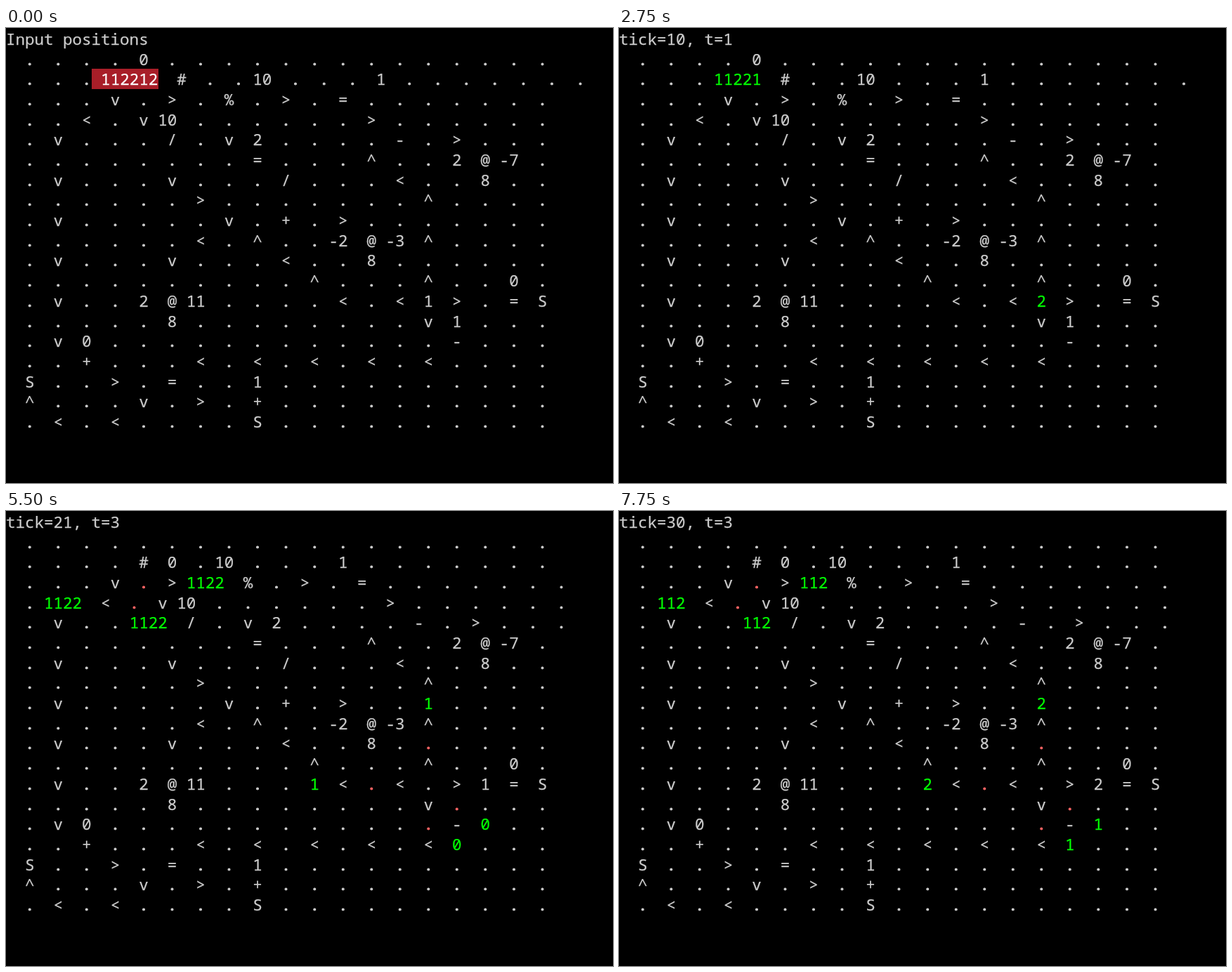
An HTML page with a canvas that plays this animation: 864x648 px, repeating every 8 s.

```html
<!DOCTYPE html>
<html lang="en">
<head>
<meta charset="utf-8">
<title>Grid program run</title>
<style>
  html, body { margin: 0; width: 100%; height: 100%; overflow: hidden; background: #000; }
  canvas { display: block; width: 864px; height: 648px; }
</style>
</head>
<body>
<canvas id="stage"></canvas>
<script>
const W = 864, H = 648, COLS = 19;
const FRAME = 250, LOOP = 8000, LAST_TICK = 30;
const ADV = 13.512, LINE = 28.69, BASE = 23.9;
const GRAY = '#ccc', GREEN = '#00ff00', RED = '#ff6464', MARK = '#a81e28';

// Trailing empty cells are left off; A is the input.
const program = `
. . . . 0
. . . A # . . 10 . . . 1
. . . v . > . % . > . =
. . < . v 10 . . . . . . >
. v . . . / . v 2 . . . . - . >
. . . . . . . . = . . . ^ . . 2 @ -7
. v . . . v . . . / . . . < . . 8
. . . . . . > . . . . . . . ^
. v . . . . . v . + . >
. . . . . . < . ^ . . -2 @ -3 ^
. v . . . v . . . < . . 8
. . . . . . . . . . ^ . . . ^ . . 0
. v . . 2 @ 11 . . . . < . < 1 > . = S
. . . . . 8 . . . . . . . . v 1
. v 0 . . . . . . . . . . . . -
. . + . . . < . < . < . < . <
S . . > . = . . 1
^ . . . v . > . +
. < . < . . . . S`;

const start = program.trim().split('\n').map(line => {
  const row = line.split(' ').map(c => c === 'A' ? '112212' : c);
  return row.concat(Array(COLS - row.length).fill('.'));
});

// Offsets [dx, dy] an arrow reads from; it writes to the opposite side.
const arrows = { '<': [1, 0], '>': [-1, 0], '^': [0, 1], 'v': [0, -1] };
const maths = {
  '+': (x, y) => x + y,
  '-': (x, y) => x - y,
  '/': (x, y) => Math.trunc(x / y),
  '%': (x, y) => x % y
};

const copy = grid => grid.map(row => row.slice());

function step(grid) {
  const reads = [], writes = [], jumps = [];
  const get = (x, y) => {
    const v = grid[y] && grid[y][x];
    return /^-?\d+$/.test(v) ? +v : null;
  };

  grid.forEach((row, y) => row.forEach((op, x) => {
    if (arrows[op]) {
      const [dx, dy] = arrows[op];
      const v = get(x + dx, y + dy);
      if (v === null) return;
      reads.push([x + dx, y + dy]);
      writes.push([x - dx, y - dy, v]);
      return;
    }
    const left = get(x - 1, y), up = get(x, y - 1);
    if (left === null || up === null) return;
    if (op === '@') {
      const dy = get(x + 1, y), dt = get(x, y + 1);
      if (dy !== null && dt !== null) jumps.push({ x: x - left, y: y - dy, v: up, dt });
      return;
    }
    let right, down;
    if (maths[op]) right = down = maths[op](left, up);
    else if ((op === '=' && left === up) || (op === '#' && left !== up)) [right, down] = [up, left];
    else return;
    reads.push([x - 1, y], [x, y - 1]);
    writes.push([x + 1, y, right], [x, y + 1, down]);
  }));
  return { reads, writes, jumps };
}

function run() {
  const history = { 1: start };
  const frames = [{ title: 'Input positions', grid: start, tint: { '3,1': 'mark' } }];
  let t = 1, tint = {};
  for (let tick = 1; tick <= LAST_TICK; tick++) {
    frames.push({ title: `tick=${tick}, t=${t}`, grid: history[t], tint });
    const { reads, writes, jumps } = step(history[t]);
    tint = {};
    const put = (grid, x, y, v) => {
      grid[y][x] = String(v);
      tint[x + ',' + y] = GREEN;
    };
    let next;
    if (jumps.length) {
      t -= jumps[0].dt;
      next = copy(history[t]);
      jumps.forEach(j => put(next, j.x, j.y, j.v));
    } else {
      next = copy(history[t++]);
      reads.forEach(([x, y]) => {
        next[y][x] = '.';
        tint[x + ',' + y] = RED;
      });
      writes.forEach(([x, y, v]) => put(next, x, y, v));
    }
    history[t] = next;
  }
  return frames;
}

const frames = run();
const stage = document.getElementById('stage');
const ctx = stage.getContext('2d');
const ratio = window.devicePixelRatio || 1;
stage.width = W * ratio;
stage.height = H * ratio;

// A thin outline sets the weight; dots are heavier than other signs.
function text(str, col, line, color) {
  const x = col * ADV, y = Math.round(BASE + line * LINE);
  ctx.fillStyle = ctx.strokeStyle = color;
  ctx.lineWidth = str.trim() === '.' ? 1.2 : 0.25;
  ctx.fillText(str, x, y);
  ctx.strokeText(str, x, y);
}

function draw({ title, grid, tint }) {
  ctx.setTransform(ratio, 0, 0, ratio, 0, 0);
  ctx.font = '22.52px "Noto Sans Mono", "DejaVu Sans Mono", monospace';
  ctx.lineJoin = 'round';
  ctx.fillStyle = '#000';
  ctx.fillRect(0, 0, W, H);
  text(title, 0, 0, GRAY);
  grid.forEach((row, y) => {
    let col = 0;
    row.forEach((cell, x) => {
      const str = ' ' + cell.padStart(2);
      let color = tint[x + ',' + y] || GRAY;
      if (color === 'mark') {
        ctx.fillStyle = MARK;
        ctx.fillRect(Math.round(col * ADV), Math.round((y + 1) * LINE + 1),
          Math.round(str.length * ADV), Math.round(LINE));
        color = '#fff';
      }
      text(str, col, y + 1, color);
      col += str.length;
    });
  });
}

const began = performance.now();
let shown = -1;
function loop() {
  const now = Math.max(0, performance.now() - began) % LOOP;
  const tick = Math.max(0, Math.floor(now / FRAME) - 1);
  if (tick !== shown) draw(frames[shown = tick]);
  requestAnimationFrame(loop);
}
loop();
</script>
</body>
</html>
```
